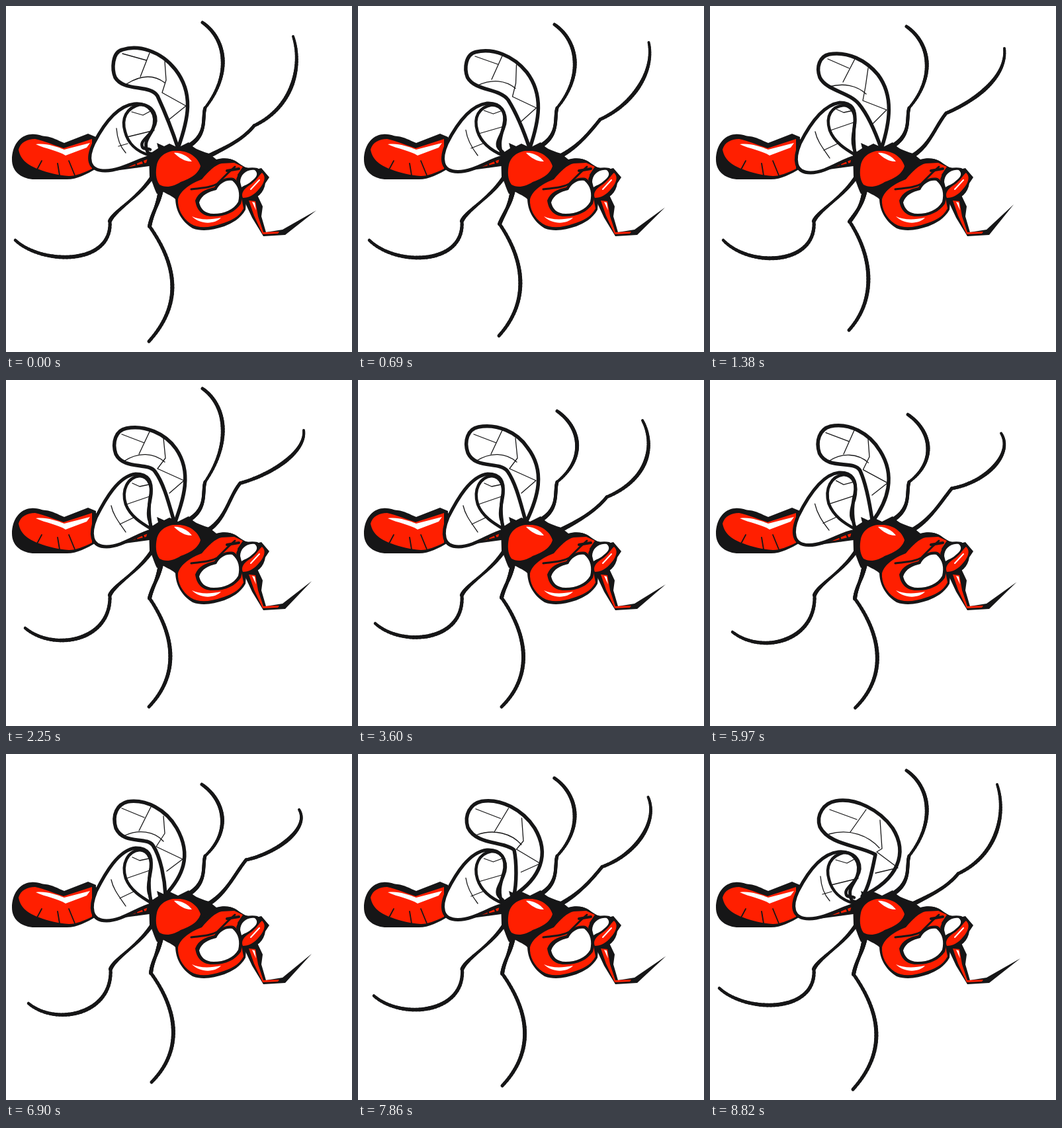
Recreate the animation shown at these times as an HTML page with a canvas. Size 523 px wide and 523 px high, loop 8.85 s.

```html
<!DOCTYPE html>
<html lang="en">
<head>
<meta charset="utf-8">
<title>Mosquito</title>
<style>
  html, body { margin: 0; width: 100%; height: 100%; overflow: hidden; background: #fff; }
  canvas { display: block; width: 100%; height: 100%; }
</style>
</head>
<body>
<canvas id="stage" width="523" height="523"></canvas>
<script>
const ctx = document.getElementById('stage').getContext('2d');
const LOOP = 8850, STEP = 30;
const BLACK = '#161617', RED = '#ff1f00', WHITE = '#fff';
const TIMES = [0, 1380, 2250, 3600, 5010, 6900, 8820];

const NUMBER = /-?\d+(\.\d+)?/g;
const numbers = s => s.match(NUMBER).map(Number);

// Blend two strings that share the same layout of numbers.
function blend(a, b, k) {
  const to = numbers(b);
  let i = 0;
  return a.replace(NUMBER, n => (+n + (to[i++] - n) * k).toFixed(2));
}

function poseAt(poses, t, times = TIMES) {
  let i = 0;
  while (i < times.length - 2 && t >= times[i + 1]) i++;
  const k = Math.min(1, (t - times[i]) / (times[i + 1] - times[i]));
  return blend(poses[i], poses[i + 1], k);
}

function fill(d, color) {
  ctx.fillStyle = color;
  ctx.fill(new Path2D(d));
}

function line(d, width, color = BLACK) {
  ctx.strokeStyle = color;
  ctx.lineWidth = width;
  ctx.stroke(new Path2D(d));
}

// Cubic stroke whose width runs through start, middle and end values.
function limb(p, w0, w1, w2) {
  const at = (t, o) => {
    const u = 1 - t;
    return u * u * u * p[o] + 3 * u * u * t * p[o + 2] + 3 * u * t * t * p[o + 4] + t * t * t * p[o + 6];
  };
  const n = 36;
  ctx.strokeStyle = BLACK;
  for (let i = 0; i < n; i++) {
    const t = i / n, v = (i + 1) / n;
    ctx.lineWidth = t < .5 ? w0 + (w1 - w0) * t * 2 : w1 + (w2 - w1) * (t * 2 - 1);
    ctx.beginPath();
    ctx.moveTo(at(t, 0), at(t, 1));
    ctx.lineTo(at(v, 0), at(v, 1));
    ctx.stroke();
  }
}

const topTimes = [0, 1380, 1800, 2250, 2730, 3600, 4320, 5010, 5700, 6900, 8100, 8820];
const topTips = ['297 25', '297 31', '297 22', '297 13', '298 29', '301 47',
  '300 22', '301 49', '300 54', '296 46', '297 34', '297 25'];

// Each leg pose: tip, two controls, knee.
const rightLeg = [
  '434 46 448 88 436 152 375 181',
  '445 64 450 110 395 146 357 162',
  '450 76 454 108 404 142 354 156',
  '430 61 448 94 444 148 376 177',
  '437 77 458 108 430 158 368 168',
  '443 84 460 112 410 150 363 160',
  '434 46 448 88 436 152 375 181'];
const leftLeg = [
  '14 354 55 392 162 392 157 325',
  '20 354 60 396 162 392 157 325',
  '29 375 72 411 160 395 157 325',
  '26 368 66 404 162 396 157 325',
  '34 385 80 419 160 398 158 325',
  '34 377 76 412 162 393 158 325',
  '14 354 55 392 162 392 157 325'];
const lowLeg = [
  '216 507 262 456 264 400 217 333',
  '210 490 250 446 248 382 211 326',
  '216 494 260 448 258 390 217 330',
  '217 494 262 450 260 390 217 329',
  '219 495 266 450 262 390 219 330',
  '220 496 266 450 262 390 219 331',
  '216 507 262 456 264 400 217 333'];
const beakTip = ['469 309', '459 300', '462 304', '465 309', '465 309', '462 302', '469 309'];

const topWing = [
  'M260 215C252 190 240 160 229 136C218 118 178 130 165 108C160 96 160 70 176 66C200 58 234 68 256 96C284 132 276 170 260 215Z',
  'M259 216C252 196 240 166 225 148C210 130 176 128 166 108C160 92 166 76 180 73C208 68 236 82 254 104C278 136 272 176 259 216Z',
  'M255 217C248 194 240 158 225 138C214 124 178 136 166 112C160 94 166 76 182 73C210 68 240 80 257 104C282 140 268 180 255 217Z',
  'M254 215C247 192 240 158 226 138C214 122 178 136 166 110C160 92 166 74 182 71C210 66 240 78 256 102C284 138 272 178 254 215Z',
  'M250 215C244 190 238 158 232 136C222 116 180 136 165 110C158 92 164 72 180 68C208 60 240 76 256 102C280 136 272 180 250 215Z',
  'M241 213C240 190 234 156 222 138C212 124 178 138 166 112C160 92 168 76 184 72C212 68 242 84 258 112C282 154 266 186 241 213Z',
  'M230 215C240 204 246 172 250 152C226 138 180 138 166 110C160 92 172 74 190 71C220 66 256 84 276 112C300 150 284 190 230 215Z'];
const midVeins = 'M175 82L209 95M218 76L201 112M178 123C200 108 224 110 240 124M238 88L241 118L229 134L269 152L247 171';
const topVeins = [
  'M176 72L212 82M217 71L203 107M182 118C204 104 224 104 240 116M240 84L242 112L236 131L272 151L246 172',
  'M178 80L210 94M219 80L201 115M180 122C202 116 222 120 236 133M239 94L235 122L231 143L267 157L244 180',
  midVeins, midVeins,
  'M175 77L210 89M217 72L203 108M180 122C200 104 224 106 241 118M240 84L242 112L236 131L270 152L247 171',
  'M175 82L209 96M219 80L201 116M180 123C200 114 224 116 238 132M238 94L240 120L227 140L267 159L243 177',
  'M181 84L222 99M236 84L212 118M180 121C212 112 240 124 256 142M257 100L260 143L252 148L284 172L250 180'];

const rearA = 'M218 228C200 232 174 249 150 249C124 249 122 230 133 207C146 182 166 151 194 148C218 146 230 164 222 186C216 200 204 206 218 228Z';
const rearB = 'M220 228C200 232 176 252 152 252C128 252 126 232 136 208C150 180 170 150 196 146C216 146 220 158 219 174C216 196 217 212 220 228Z';
const rearC = 'M220 228C200 232 176 252 152 252C128 252 126 232 136 208C150 180 170 145 196 142C216 142 221 154 219 172C214 194 217 212 220 228Z';
const rearD = 'M219 228C196 230 172 248 146 247C122 246 120 228 130 204C144 176 168 140 194 138C214 136 224 150 219 172C212 194 215 212 219 228Z';
const rearWing = [rearA, rearB, rearC, rearC, rearD, rearC, rearA];

const foldA = 'M218 226C196 220 184 206 180 190C174 170 182 154 202 149C224 149 232 170 222 186C216 198 202 204 206 213C209 218 214 214 218 217';
const foldB = 'M221 226C204 216 188 206 181 188C174 166 184 152 202 150C216 151 222 166 218 184C216 194 215 206 217 213C218 218 220 222 221 226';
const foldC = 'M221 226C204 216 188 206 181 188C174 166 184 147 202 145C218 146 222 164 218 182C215 194 214 206 217 213C218 218 220 222 221 226';
const foldD = 'M220 226C200 216 186 206 178 186C172 162 182 144 202 141C220 142 224 160 219 178C212 192 208 206 215 213C217 218 219 222 220 226';
const fold = [foldA, foldB, foldC, foldC, foldD, foldC, foldA];

const rearVeinsA = 'M167 185C168 200 172 212 181 222M170 212L184 208M183 198L224 188M190 160L207 165L220 158';
const rearVeinsB = 'M159 190C162 204 170 214 181 230M172 218L193 208M182 188L217 176M191 156L202 161L216 158';
const rearVeinsD = 'M158 184C162 200 168 212 179 224M170 215L190 206M180 186L218 174M190 148L202 155L218 150';
const rearVeins = [rearVeinsA, rearVeinsB, rearVeinsB, rearVeinsB, rearVeinsD, rearVeinsB, rearVeinsA];

function drawLegs(t) {
  const [x, y] = numbers(poseAt(topTips, t, topTimes));
  limb([x, y, x + 35, y + 24, x + 45, 84 + y * .72, 301, 154], 5, 6, 4);
  limb([301, 154, 296, 170, 306, 196, 272, 214], 5, 5, 7);

  const r = numbers(poseAt(rightLeg, t));
  limb(r, 4, 6, 5);
  limb([r[6], r[7], r[6] - 18, r[7] + 22, 332, 214, 300, 230], 5, 5, 7);

  const l = numbers(poseAt(leftLeg, t));
  limb(l, 4.5, 6, 5);
  limb([l[6], l[7], 165, 308, 200, 290, 221, 258], 6, 4, 6);

  const d = numbers(poseAt(lowLeg, t));
  limb(d, 5, 6, 5);
  limb([d[6], d[7], 221, 312, 230, 302, 234, 278], 6, 5, 8);
}

function drawAbdomen() {
  fill('M9 232C9 212 20 195 38 194C48 193 54 197 60 197C70 198 78 203 88 207L124 193L136 198V246C122 254 108 262 92 262H40C22 260 9 250 9 232Z', BLACK);
  fill('M19 217C22 206 32 201 44 201C58 204 72 210 87 215L130 201V246C118 252 106 257 95 257C80 256 62 252 50 247C36 242 22 234 19 217Z', RED);
  fill('M45 209C60 207 75 212 88 217L127 207L122 214L90 226C80 219 60 216 45 209Z', WHITE);
  line('M54 234L47 247M78 238L81 256M95 234L104 256', 1.8);
  fill('M130 200L224 222V241L165 249L140 246Z', BLACK);
  fill('M162 245L185 233L215 226L212 237L188 243Z', RED);
  line('M193 229L198 243M204 228L209 240', 2.5);
}

function drawWings(t) {
  const top = poseAt(topWing, t);
  fill(top, WHITE);
  line(poseAt(topVeins, t), 1.3);
  line(top, 5.5);

  const rear = poseAt(rearWing, t);
  fill(rear, WHITE);
  line(poseAt(rearVeins, t), 1.3);
  line(rear, 5);
  line(poseAt(fold, t), 4.5);
}

function drawBeak(t) {
  const tip = poseAt(beakTip, t);
  fill(`M358 290L372 320L389 348L422 346L${tip}L418 338L393 342L386 318L388 303L380 286Z`, BLACK);
  fill('M367 294L377 295L381 318L389 342L413 341L411 344L388 345L375 317Z', RED);
  fill('M372 296L376 297L378 309Z', WHITE);
}

function drawThorax() {
  fill('M216 224L230 215L228 207L239 212L247 208L260 214L276 206C282 214 290 218 307 223L318 232C330 228 345 231 352 238L362 244L300 270L262 300C256 288 246 286 238 281L228 284C223 274 221 264 217 258Z', BLACK);
  fill('M228 240C231 226 245 218 258 219C275 218 290 228 294 242C290 256 275 262 264 266C252 274 240 275 232 270C226 262 226 250 228 240Z', RED);
  fill('M254 222C262 221 274 226 281 235C272 236 262 230 254 222Z', WHITE);
}

function drawHead() {
  fill('M290 254C304 244 314 233 326 231C340 229 348 234 358 243L378 247L386 245L398 259L392 268C390 282 380 292 363 295L362 308C354 322 342 328 330 333C314 338 298 342 282 336C266 326 256 310 256 290Z', BLACK);
  fill('M260 292C264 278 280 268 296 262C306 250 316 240 326 238L345 237L358 243L350 255L356 290L359 306C352 320 338 325 326 329C308 335 292 337 279 329C266 320 259 306 260 292Z', RED);
  fill('M286 294C291 281 302 277 315 274C322 264 331 258 344 260C356 268 360 284 355 299C346 312 330 319 312 318C296 318 288 308 286 294Z', BLACK);
  line('M280 277C296 275 308 275 319 269L336 252L346 243', 3);
  line('M334 249L352 246', 4);
  fill('M292 297C296 285 306 281 318 278C322 269 332 262 342 264C352 272 354 284 351 296C344 308 330 314 314 314C300 314 294 306 292 297Z', WHITE);

  fill('M348 262C352 248 364 242 380 245L388 251L372 274L355 281Z', BLACK);
  fill('M354 266C354 255 364 246 376 248C382 253 379 259 372 264C366 270 360 271 356 274Z', WHITE);
  fill('M358 290C355 283 359 277 368 271C378 265 382 256 387 252C394 258 390 268 383 276C375 286 367 290 358 290Z', RED);
  line('M370 277L383 263', 2, WHITE);
  fill('M281 318C292 323 306 324 325 320C316 330 294 331 281 318Z', WHITE);
}

function draw(now) {
  const t = Math.floor((now % LOOP) / STEP) * STEP;
  ctx.fillStyle = WHITE;
  ctx.fillRect(0, 0, 523, 523);
  ctx.lineCap = ctx.lineJoin = 'round';
  drawLegs(t);
  drawAbdomen();
  drawWings(t);
  drawThorax();
  drawBeak(t);
  drawHead();
}

const start = performance.now();
function tick() {
  draw(performance.now() - start);
  requestAnimationFrame(tick);
}
tick();
</script>
</body>
</html>
```
